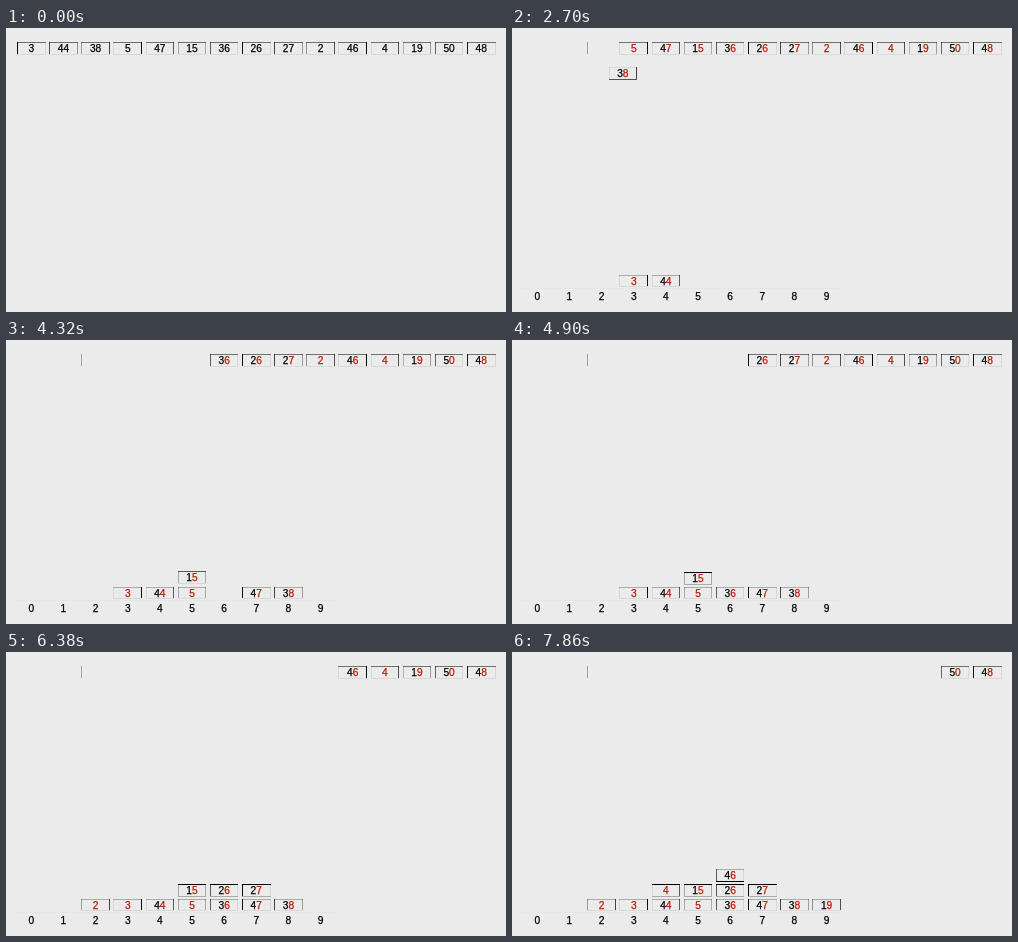
Animation, 500 px wide and 284 px high, one loop 8000 ms. Source, as an HTML page with a canvas:

```html
<!DOCTYPE html>
<html lang="en">
<head>
<meta charset="utf-8">
<title>Radix sort</title>
<style>
  html, body { margin: 0; width: 100%; height: 100%; overflow: hidden; background: #ebebeb; }
  canvas { display: block; }
</style>
</head>
<body>
<canvas id="stage" width="500" height="284"></canvas>
<script>
const ctx = document.getElementById("stage").getContext("2d");
const values = [3, 44, 38, 5, 47, 15, 36, 26, 27, 2, 46, 4, 19, 50, 48];

const LOOP = 8000, MARK_TIME = 1200;
const TICK = 147.75, FIRST_LANDING = 1942;       // ms
const FIRST_START = -2.18, PERIOD = 10 / 3, DURATION = 1.7; // ticks
const CARD_W = 27.6, CARD_H = 11.7, BASELINE = 9.3;
const ROW_Y = 14.3, STACK_Y = 247.2, STACK_STEP = 14.7, LABEL_Y = 271.5;
const BLACK = "#000", RED = "#b51a08";

const columnX = i => 11.5 + 32.14 * i;

// Each card drops on top of the earlier ones with the same last digit.
const counts = Array(10).fill(0);
const cards = values.map((value, i) => {
  const digit = value % 10;
  return {
    text: String(value),
    fromX: columnX(i),
    toX: columnX(digit),
    toY: STACK_Y - STACK_STEP * counts[digit]++,
    start: FIRST_START + PERIOD * i
  };
});

function easeCubicInOut(p) {
  return p < 0.5 ? 4 * p ** 3 : 1 - 4 * (1 - p) ** 3;
}

// A hairline fills one pixel and fades as it strays from the pixel's centre.
function hairlineColor(position) {
  const offset = Math.abs(position - Math.floor(position) - 0.5);
  return `rgba(0, 0, 0, ${Math.max(0.08, 1 - 2.4 * offset)})`;
}

function drawVertical(x, y) {
  const top = Math.floor(y);
  ctx.fillStyle = hairlineColor(x);
  ctx.fillRect(Math.floor(x), top, 1, Math.floor(y + CARD_H) - top);
}

function drawHorizontal(x, y) {
  const left = Math.floor(x);
  ctx.fillStyle = hairlineColor(y);
  ctx.fillRect(left, Math.floor(y), Math.floor(x + CARD_W) - left + 1, 1);
}

function drawText(text, color, x, y) {
  ctx.fillStyle = ctx.strokeStyle = color;
  ctx.fillText(text, x, y);
  ctx.strokeText(text, x, y);
}

function drawCard(card, tick, marked) {
  const progress = Math.min(1, Math.max(0, (tick - card.start) / DURATION));
  const k = easeCubicInOut(progress);
  const x = card.fromX + (card.toX - card.fromX) * k;
  const y = ROW_Y + (card.toY - ROW_Y) * k;
  drawVertical(x, y);
  drawVertical(x + CARD_W, y);
  drawHorizontal(x, y);
  drawHorizontal(x, y + CARD_H);

  const head = card.text.slice(0, -1);
  const left = x + (CARD_W - ctx.measureText(card.text).width) / 2;
  drawText(head, BLACK, left, y + BASELINE);
  drawText(card.text.slice(-1), marked ? RED : BLACK,
           left + ctx.measureText(head).width, y + BASELINE);
}

function drawBuckets() {
  ctx.fillStyle = "#e6e6e6";
  ctx.fillRect(11, 260, 318, 1);
  for (let d = 0; d < 10; d++) {
    const label = String(d);
    const width = ctx.measureText(label).width;
    drawText(label, BLACK, columnX(d) + (CARD_W - width) / 2, LABEL_Y);
  }
}

function draw(time) {
  const tick = Math.floor((time - FIRST_LANDING) / TICK);
  const marked = time >= MARK_TIME;
  ctx.fillStyle = "#ebebeb";
  ctx.fillRect(0, 0, 500, 284);
  ctx.font = '10.2px "Liberation Sans", Arial, sans-serif';
  ctx.lineWidth = 0.25;

  if (marked) drawBuckets();
  // The left edge of the third slot stays behind when its card leaves.
  if (tick > cards[2].start) drawVertical(columnX(2), ROW_Y);
  for (const card of cards) drawCard(card, tick, marked);
}

const origin = performance.now();
function loop() {
  draw((performance.now() - origin) % LOOP);
  requestAnimationFrame(loop);
}
loop();
</script>
</body>
</html>
```
